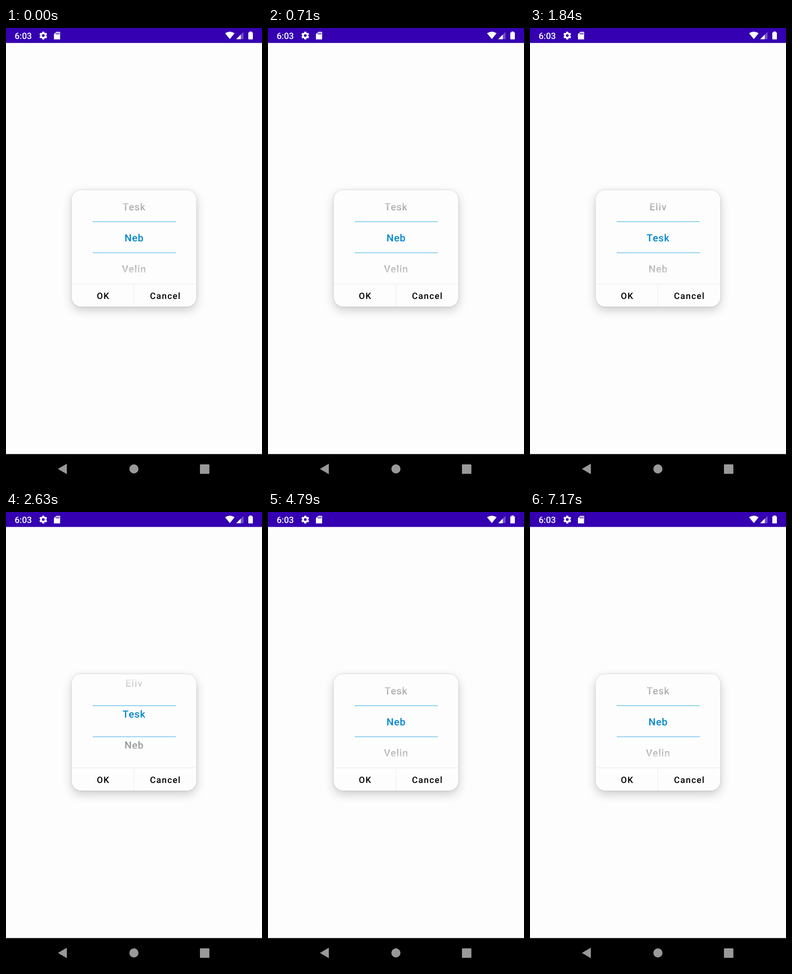
An HTML page with a canvas for the animation above (7330 ms loop, 561 by 998 pixels).

```html
<!DOCTYPE html>
<html lang="en">
<head>
<meta charset="utf-8">
<title>Name picker dialog</title>
<style>
  html, body { margin: 0; width: 100%; height: 100%; overflow: hidden; background: #fdfdfd; }
  canvas { display: block; width: 561px; height: 998px; }
</style>
</head>
<body>
<canvas id="stage" width="561" height="998"></canvas>
<script>
const ctx = document.getElementById('stage').getContext('2d');
const LOOP = 7330;
const ROW = 68;
const NAMES = ['Eliv', 'Tesk', 'Neb', 'Velin'];
const BAR = '#3500b1';
const PAPER = '#fdfdfd';
const card = { x: 144.2, y: 355, w: 272.7, h: 254.6, r: 20.5 };
const picker = { top: 355, bottom: 559.5, middle: 459 };

// Each swipe drags part of a row, then the wheel settles on the next name.
const SWIPES = [
  { start: 750, release: 1030, step: -1 },
  { start: 1880, release: 3000, step: 1 }
];
const SETTLE = 800;
const DRAGGED = 38 / ROW;

function swipeProgress(t, { start, release }) {
  if (t <= start) return 0;
  if (t < release) return DRAGGED * ((t - start) / (release - start)) ** 2;
  const rest = Math.max(0, 1 - (t - release) / SETTLE);
  return 1 - (1 - DRAGGED) * rest ** 5;
}

function wheelPosition(t) {
  return SWIPES.reduce((pos, s) => pos + s.step * swipeProgress(t, s), 2);
}

function rect(x, y, w, h, color) {
  ctx.fillStyle = color;
  ctx.fillRect(x, y, w, h);
}

function roundRect(x, y, w, h, r, color) {
  ctx.fillStyle = color;
  ctx.beginPath();
  ctx.roundRect(x, y, w, h, r);
  ctx.fill();
}

function polygon(points, color) {
  ctx.fillStyle = color;
  ctx.beginPath();
  points.forEach(([x, y]) => ctx.lineTo(x, y));
  ctx.closePath();
  ctx.fill();
}

function disc(x, y, r, color) {
  ctx.fillStyle = color;
  ctx.beginPath();
  ctx.arc(x, y, r, 0, Math.PI * 2);
  ctx.fill();
}

function label(text, x, y, size, spacing, color, align = 'center') {
  ctx.font = `500 ${size}px Roboto, sans-serif`;
  ctx.textRendering = 'geometricPrecision';
  ctx.letterSpacing = spacing + 'px';
  ctx.textAlign = align;
  ctx.fillStyle = color;
  ctx.fillText(text, x, y);
}

// Vertical fade that hides rows towards the picker's edges.
function faded(rgb) {
  const fade = ctx.createLinearGradient(0, picker.top, 0, picker.bottom);
  [[0, 0], [0.4, 1], [0.6, 1], [1, 0]].forEach(([at, alpha]) =>
    fade.addColorStop(at, `rgba(${rgb}, ${alpha})`));
  return fade;
}

const ink = {
  selected: faded('0, 134, 205'),
  normal: faded('88, 88, 86'),
  line: faded('76, 180, 232')
};

function drawGear(x, y) {
  ctx.save();
  ctx.translate(x, y);
  for (let i = 0; i < 6; i++) {
    ctx.rotate(Math.PI / 3);
    polygon([[-2.9, -5], [-2, -8.6], [2, -8.6], [2.9, -5]], '#fff');
  }
  disc(0, 0, 6.5, '#fff');
  disc(0, 0, 3, BAR);
  ctx.restore();
}

function drawStatusBar() {
  rect(0, 0, 561, 32.7, BAR);
  label('6:03', 19, 23.8, 19.1, 0, '#fff', 'left');
  drawGear(81.7, 16.6);

  polygon([[110, 8.5], [118.5, 8.5], [118.5, 25], [105, 25], [105, 13.5]], '#fff');
  [109, 112, 115].forEach(x => rect(x, 10.5, 1.6, 3.8, BAR));

  ctx.fillStyle = '#fff';
  ctx.beginPath();
  ctx.moveTo(490.5, 24.3);
  ctx.lineTo(480, 11.6);
  ctx.quadraticCurveTo(490.5, 4.3, 501, 11.6);
  ctx.fill();

  polygon([[504.5, 24.5], [520.5, 8.5], [520.5, 24.5]], 'rgba(255,255,255,.3)');
  polygon([[504.5, 24.5], [514.5, 14.5], [514.5, 24.5]], '#fff');

  roundRect(531, 9.5, 10, 15.5, 1.2, '#fff');
  rect(533.5, 7.7, 5, 2.3, '#fff');
}

function drawNavigation() {
  rect(0, 932.5, 561, 65.5, '#000');
  polygon([[113.8, 965], [133.4, 953.6], [133.4, 976.4]], '#999');
  disc(280.3, 965, 10, '#999');
  roundRect(425, 955, 20.7, 20.7, 1.5, '#999');
}

function drawCard() {
  const { x, y, w, h, r } = card;
  const cast = (alpha, blur, offset) => {
    ctx.shadowColor = `rgba(0,0,0,${alpha})`;
    ctx.shadowBlur = blur;
    ctx.shadowOffsetY = offset;
    roundRect(x, y, w, h, r, PAPER);
  };
  ctx.save();
  cast(0.2, 22, 8);
  cast(0.12, 5, 0);
  ctx.restore();

  rect(x, 559.2, w, 1.4, '#efeff4');
  rect(279.1, 560.6, 1.4, 49, '#efeff4');
  label('OK', 213.1, 592.8, 19.1, 1.6, '#000');
  label('Cancel', 349.5, 592.8, 19.1, 1.6, '#000');
}

function drawPicker(t) {
  const position = wheelPosition(t);
  const selected = Math.round(position);
  ctx.save();
  ctx.beginPath();
  ctx.rect(card.x, picker.top, card.w, picker.bottom - picker.top);
  ctx.clip();
  for (let i = selected - 2; i <= selected + 2; i++) {
    const name = NAMES[(i + NAMES.length) % NAMES.length];
    const y = picker.middle + Math.round((i - position) * ROW) + 7.8;
    label(name, 280.9, y, 21.8, 1, i === selected ? ink.selected : ink.normal);
  }
  [423.1, 491.1].forEach(y => rect(190, y, 182, 1.5, ink.line));
  ctx.restore();
}

function draw(now) {
  rect(0, 0, 561, 998, PAPER);
  drawStatusBar();
  drawNavigation();
  drawCard();
  drawPicker(now % LOOP);
  requestAnimationFrame(draw);
}

requestAnimationFrame(draw);
</script>
</body>
</html>
```
